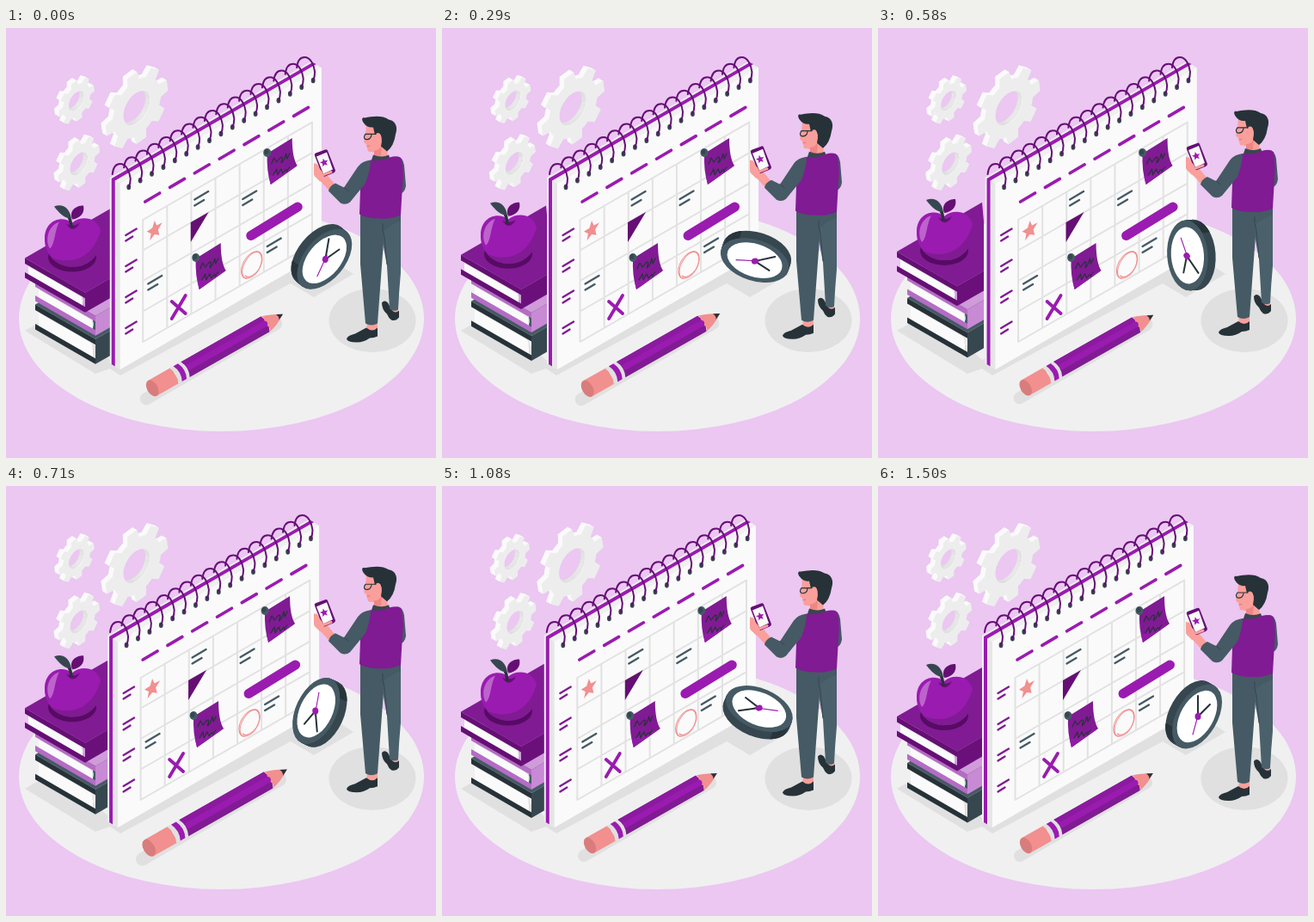
Write an HTML page that moves like this. It is 500 px wide and 500 px high and loops after 1.54 s.

```html
<!DOCTYPE html>
<html lang="en">
<head>
<meta charset="utf-8">
<title>Planning calendar</title>
<style>
  html, body { margin: 0; height: 100%; overflow: hidden; background: #ebc7f2; }
  svg { display: block; width: 100vw; height: 100vh; }
</style>
</head>
<body>
<svg id="stage" viewBox="0 0 500 500"></svg>
<script>
const VIVID = '#9a1bb0', PURPLE = '#801b93', DEEP = '#650f74';
const NAVY = '#263238', SLATE = '#455a64', PINK = '#f28f8f', SKIN = '#fa9f9b', SHADE = '#e0e0e0';

const fill = (d, color, extra = '') => `<path d="${d}" fill="${color}" ${extra}/>`;
const line = (d, color, width, extra = '') =>
  `<path d="${d}" fill="none" stroke="${color}" stroke-width="${width}" stroke-linecap="round" stroke-linejoin="round" ${extra}/>`;
const oval = (x, y, rx, ry, color, extra = '') =>
  `<ellipse cx="${x}" cy="${y}" rx="${rx}" ry="${ry}" fill="${color}" ${extra}/>`;
const at = (x, y, content, more = '') => `<g transform="translate(${x} ${y}) ${more}">${content}</g>`;
const group = (id, content) => `<g id="${id}">${content}</g>`;
const repeat = (n, draw) => Array.from({ length: n }, (_, i) => draw(i)).join('');

// Places content on the upright plane that the calendar stands in.
const upright = (x, y, content) => at(x, y, content, 'matrix(.866 -.5 0 1 0 0)');
// Stacks copies from the back towards the viewer.
const extrude = (x, y, depth, content) =>
  repeat(depth, i => upright(x - (depth - i) * .866, y - (depth - i) * .5, content));

const circlePath = r => `M${r} 0A${r} ${r} 0 1 1 ${-r} 0A${r} ${r} 0 1 1 ${r} 0Z`;

function starPath(r) {
  return 'M' + Array.from({ length: 10 }, (_, i) => {
    const a = i * Math.PI / 5 - Math.PI / 2, s = i % 2 ? r * .45 : r;
    return `${Math.cos(a) * s} ${Math.sin(a) * s}`;
  }).join('L') + 'Z';
}

function gear(x, y, r, hole) {
  const root = r * .77;
  const p = (a, s) => `${Math.cos(a) * s} ${Math.sin(a) * s}`;
  let d = '';
  for (let i = 0; i < 8; i++) {
    const a = i * Math.PI / 4 - .15;
    d += (i ? `A${root} ${root} 0 0 1 ` : 'M') + p(a - .25, root) +
      `L${p(a - .16, r)}L${p(a + .16, r)}L${p(a + .25, root)}`;
  }
  d += `A${root} ${root} 0 0 1 ${p(-.4, root)}Z` + circlePath(hole);
  const even = 'fill-rule="evenodd"';
  return extrude(x, y, 6, fill(d, '#fafafa', even) + line(circlePath(hole), '#dedede', 1)) +
    upright(x, y, fill(d, '#ededed', even));
}

function book(x, y, w, d, h, cover, side, top) {
  const k = .577, fx = x + w, fy = y + w * k, t = 6.5;
  const strip = y0 => `M${x} ${y0}l${w} ${w * k}v${t}l${-w} ${-w * k}z`;
  return fill(`M${x} ${y}L${fx} ${fy}l${d} ${-d * k}V${y + (w - d) * k - 58}L${x + d + 68} ${y - (d + 68) * k}Z`, top) +
    fill(`M${fx} ${fy}l${d} ${-d * k}v${h}l${-d} ${d * k}z`, side) +
    fill(`M${x + 4} ${y + 5}L${fx - 3} ${fy + 2}v${h - 6}L${x + 4} ${y + h - 3}z`, '#fafafa') +
    line(`M${x + 6} ${y + 10}l${w - 12} ${(w - 12) * k}q4 3 3 9`, SHADE, 1.2) +
    fill(strip(y), cover) + fill(strip(y + h - t), cover);
}

function apple() {
  return oval(77, 267, 28, 17, '#570b64') +
    fill('M77 227C86 219 105 219 110 236C116 256 100 278 80 278C60 280 44 263 45 245C45 225 64 217 77 227Z', VIVID) +
    fill('M110 236C116 256 100 278 80 278C68 279 58 274 52 267C78 278 102 266 110 236Z', PURPLE) +
    fill('M62 226C49 230 45 247 51 257C57 253 56 237 62 226Z', '#bd63cc') +
    fill('M70 228Q78 233 86 227Q78 241 70 228Z', DEEP) +
    line('M76 231C75 221 71 214 64 210', NAVY, 3.5) +
    fill('M56 208C66 204 74 210 76 222C68 222 62 216 56 208Z', '#37474f') +
    fill('M77 223C73 213 81 207 90 207C92 216 86 222 77 223Z', DEEP);
}

function note() {
  return fill('M304 146L333 128Q333 151 339 160L308 182Q303 165 304 146Z', PURPLE) +
    fill('M306 173Q317 167 339 160L308 182Z', '#8f1ca4') +
    line('M309 158l3-7 3 5 4-5q4-3 2 3t3-2l2-6 1 6 3-6M311 171l4-7 1 7 4-7 2 5q4-6 5-4t-1 2l4-5', NAVY, 1.2) +
    oval(304, 145, 4.5, 5, SLATE) + oval(303, 144, 2.5, 3, '#37474f');
}

function calendar() {
  const gridLines = repeat(8, i => `M${159.5 + i * 28.1} ${223 - i * 16.2}v142`) +
    repeat(5, i => `M159.5 ${223 + i * 35.5}l196.7 -113.4`);
  const entry = (x, y) => line(`M${x} ${y}l16 -9.5M${x} ${y + 7}l11 -6.5`, SLATE, 2.3);
  return fill('M121 174L355 39L367 46V262L133 397L121 390Z', '#f0f0f0') +
    fill('M123 175L357 40L361 42L127 177.500V393.500L123 391Z', VIVID) +
    fill('M128 178L133 181V397L128 394Z', '#e6e6e6') +
    fill('M133 181L367 46V262L133 397Z', '#fafafa') +
    line(gridLines, '#e2e2e2', 2) +
    repeat(7, i => line(`M162 ${202}l17 -10`, VIVID, 3.6, `transform="translate(${i * 28.8} ${i * -16.6})"`)) +
    repeat(4, i => line(`M139.500 ${241 + i * 36}l12.500 -7.500m-12.500 14l8 -5`, PURPLE, 2.3)) +
    entry(219.5, 199.500) + entry(275.5, 199) + entry(165.5, 297.500) + entry(304, 254) +
    upright(173, 235, fill(starPath(11), PINK)) +
    fill('M215 226L236 214L215 249Z', DEEP) +
    line('M285 241.500L339.500 208', VIVID, 11) +
    line('M193 318L209 332M209 311L193 338', VIVID, 3.8) +
    upright(286, 275.5, line(circlePath(14), PINK, 1.2) +
      line('M-11 9C-17 -3 -6 -14 3 -13C15 -11 16 4 9 10C4 14 -5 14 -9 8', PINK, 1.2)) +
    note() + at(-83, 122, note()) +
    repeat(17, i => at(143 + i * 13.4, 185 - i * 7.75,
      oval(0, 0, 2.4, 3.2, '#37474f') + line('M-19 -15c1 -9 5 -12 9 -12c7 0 11 9 12 17c0 4 -1 8 -2 10', DEEP, 2)));
}

function clock() {
  const dark = line('M-32.500 -3A33 33 0 0 0 -28 16', NAVY, 2);
  return extrude(371, 268, 9, fill(circlePath(33.5), '#37474f') + dark) +
    upright(371, 268, fill(circlePath(33.5), SLATE) + fill(circlePath(27), '#fff')) +
    line('M372 268V244M372 268L386 254', NAVY, 2) +
    line('M373 263L366 289', VIVID, 1.1) + oval(372, 268, 3.5, 4, VIVID);
}

function pencil() {
  const parts =
    fill('M0 -10H30V10H0Z', PINK) + oval(0, 0, 6, 10, '#d97c7c') +
    fill('M28 -10H45V10H28Q34 0 28 -10Z', SHADE) + fill('M33 -10H39Q44 0 39 10H33Q38 0 33 -10Z', VIVID) +
    fill('M43 -10H147L151 0L147 10H43Q48 0 43 -10Z', PURPLE) +
    fill('M43 -10H147L149 -4H46Z', '#8b1a9f') + fill('M46 -4H149L151 3H46Z', VIVID) +
    fill('M147 -10Q158 -7 170 0Q158 8 147 10Q151 6 148 3Q152 -1 148 -4Q150 -8 147 -10Z', PINK) +
    fill('M163 -3.500L170 0L163 3.500Q165 0 163 -3.500Z', NAVY);
  return line('M165 430L312 345', SHADE, 14) + at(172, 418, parts, 'rotate(-29.6)');
}

function man() {
  return fill('M455 150Q461 150 463 160L465 184Q464 192 457 194L452 180Z', SLATE) +
    // shoes, ankles and trousers
    fill('M420 342H432V354Q425 358 419 353Z', SKIN) + fill('M447 324H456V333Q450 336 447 330Z', SKIN) +
    fill('M396 362Q397 358 406 356L419 349Q426 355 432 349V359Q428 361 423 361Q416 366 408 366Q397 366 396 362Z', NAVY) +
    fill('M437 320Q440 316 444 320L449 329Q453 333 457 329V337Q453 342 448 340Q445 338 443 333Q437 328 437 320Z', NAVY) +
    fill('M434 215H459L459 285Q457 306 456 328Q451 331 446 327L443 277L436 238Z', '#4a616c') +
    fill('M412 212L459 212V225Q448 229 440 236L436 290L432 344Q425 348 418 344L412 275Z', SLATE) +
    line('M438 228Q437 236 440 243L443 275', '#37474f', 1) +
    // head
    fill('M419 113L418 125L416 133L419 136L421 144L428 145V152L443 152L445 125L440 112Z', SKIN) +
    fill('M428 143Q434 143 437 137L436 149L428 150Z', '#ee8684') +
    fill('M416 111C413 107 414 104 417 105C427 103 438 102 445 107C453 108 456 116 453 124Q451 138 443 144L436 138Q439 125 433 123L429 125L427 116Q420 117 416 111Z', NAVY) +
    oval(432, 128, 4, 5.5, SKIN, 'transform="rotate(15 432 128)"') +
    line('M430 124L418 124M418 124Q415 128 418 130Q424 131 425 125', NAVY, 1.2) +
    line('M420 138l3 -.5', '#d97070', .8) +
    // vest and arms
    fill('M427 148Q437 152 445 148L448 156L424 157Z', '#37474f') +
    fill('M424 154Q436 156 446 151Q457 148 460 153Q463 168 461 183L459 218Q448 223 434 222Q419 222 411 217L413 160Z', PURPLE) +
    fill('M379 193L367 180L359 173Q356 165 361 158L366 164L374 163Q379 165 373 171L384 184Z', SKIN) +
    fill('M359 149Q358 147 360 146L371 142Q373 141 374 143L383 166Q383 168 381 169L371 173Q369 174 368 172Z', DEEP) +
    fill('M361 150L373 145L380 165L369 170Z', '#fafafa') +
    at(370, 157, fill(starPath(5), VIVID), 'rotate(-15)') +
    fill('M358 158Q361 157 364 164Q369 167 370 175L365 179L358 171Z', SKIN) +
    line('M370 171l8 -3', SKIN, 3) +
    fill('M424 154Q414 155 409 162L393 186L383 181Q376 184 375 190L389 204Q395 207 400 203L418 181Q424 165 424 154Z', SLATE) +
    line('M393 186l5 4', '#37474f', 1);
}

const stage = document.getElementById('stage');
stage.innerHTML =
  oval(250.5, 338, 235.5, 131, '#f0f0f0') +
  fill('M22 352L60 330L121 386L330 270L367 262L404 286L358 313L331 297L133 404L121 396L104 402Z', SHADE) +
  oval(426, 340, 50.5, 37, SHADE) +
  group('gears', gear(152, 93, 42, 18) + gear(82, 85, 24, 10.5) + gear(85, 158, 28, 12)) +
  group('books',
    book(34, 322, 70, 19, 29, NAVY, '#37474f', SLATE) +
    book(34, 295, 70, 19, 23, '#b46cc4', '#c88ad4', '#cf9bd9') +
    book(22, 268, 70, 31, 23, DEEP, '#6b107b', PURPLE) + apple()) +
  group('calendar', calendar()) + group('clock', clock()) +
  group('pencil', pencil()) + group('man', man());

// Linear interpolation through [phase, value] stops.
function track(p, stops) {
  const i = Math.max(1, stops.findIndex(s => s[0] >= p));
  const [p0, v0] = stops[i - 1], [p1, v1] = stops[i];
  return v0 + (v1 - v0) * (p - p0) / (p1 - p0);
}

const LOOP = 1540, STEPS = 37;
const SHAKE = [0, -1, 2, -4, 4, -4, 4, -4, 2, -1, 0].map((v, i) => [i / 10, v]);
const BEAT = [[0, 1], [.1, 1.1], [.3, 1], [.4, 1], [.5, 1.1], [.6, 1], [1, 1]];
const SWAY = [[0, 0], [.25, 1], [.75, -1], [1, 0]];
const FLOAT = [[0, 0], [.5, -10], [1, 0]];
const move = (id, transform) => document.getElementById(id).setAttribute('transform', transform);

function render() {
  const t = performance.now() % LOOP;
  const step = Math.min(STEPS - 1, Math.floor((t + 4.9) * .024)); // 24 pictures per second
  const p = (step + 1) / STEPS;
  const lift = `translate(0 ${track(p, FLOAT)})`;
  move('books', lift);
  move('man', lift);
  move('gears', `rotate(${track(p, SWAY)} 121 118)`);
  move('calendar', `translate(${track(p, SHAKE)} 0)`);
  move('clock', `rotate(${p * 360} 366 264.5)`);
  move('pencil', `translate(239 385) scale(${track(p, BEAT)}) translate(-239 -385)`);
  requestAnimationFrame(render);
}
render();
</script>
</body>
</html>
```
